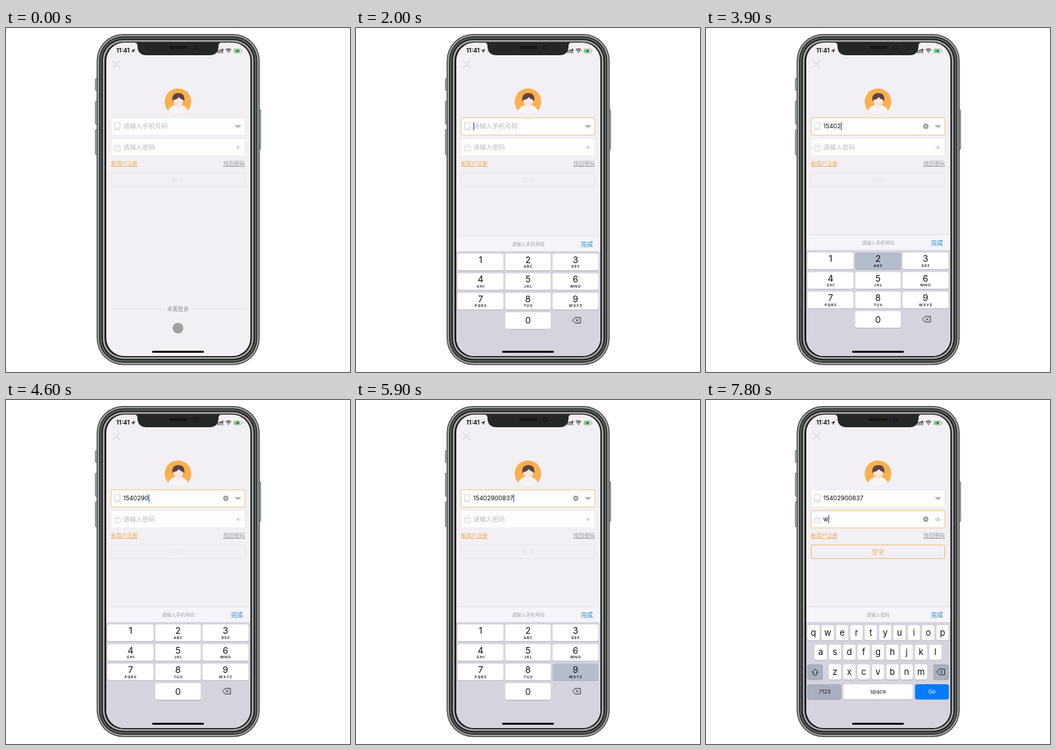
An HTML page for the animation above (8000 ms loop, 518x518 px).

```html
<!DOCTYPE html>
<html lang="zh-CN">
<head>
<meta charset="utf-8">
<title>Login</title>
<style>
  html, body { margin: 0; width: 100%; height: 100%; overflow: hidden; background: #fff; }
  svg { display: block; width: 100vw; height: 100vh; font-family: Inter, "Noto Sans CJK SC", "Noto Sans CJK", sans-serif; }
</style>
</head>
<body>
<svg id="stage" viewBox="0 0 518 518">
  <defs>
    <clipPath id="screen"><rect x="151" y="22" width="217" height="472" rx="27"/></clipPath>
    <clipPath id="portrait"><circle cx="259" cy="111" r="20"/></clipPath>
  </defs>

  <g fill="#b5b8b8" stroke="#555958" stroke-width=".8">
    <rect x="134.500" y="76" width="3" height="18" rx="1"/>
    <rect x="134.500" y="110" width="3" height="35" rx="1"/>
    <rect x="134.500" y="153" width="3" height="38" rx="1"/>
    <rect x="381" y="123" width="2.500" height="60" rx="1"/>
  </g>
  <g id="frame"></g>

  <g clip-path="url(#screen)">
    <rect x="151" y="22" width="217" height="472" fill="#f2f0f5"/>
    <path d="M161 49l11 11m0-11l-11 11" stroke="#c8c7cb" fill="none"/>
    <circle cx="259" cy="111" r="20" fill="#fbb04f"/>
    <g clip-path="url(#portrait)">
      <path d="M243 133c0-11 5-16 12-17h8c7 1 12 6 12 17z" fill="#f7f4f6"/>
      <path d="M252 106q7-6 15 0 0 8-4 11.500-3.500 3-7 0-4-3.500-4-11.500z" fill="#fde5df"/>
      <path d="M250.500 110q-1.500-12 9-12t9 12q-1.500 0-2-2-4-.5-6-4-3 4-8 4-.5 2-2 2z" fill="#5e4443"/>
    </g>
    <g id="form"></g>
    <g id="keyboard"></g>
    <rect x="220" y="486" width="78" height="3" rx="1.500" fill="#000"/>
    <text x="166" y="37.300" font-size="9.100" font-weight="600">11:41</text>
    <path d="M188 34.500l6.500-3.300-3 6.600-.4-3z" fill="#222"/>
    <g fill="#222">
      <path d="M318 34h1.500v1.500h-1.500zM320.500 33h1.500v2.500h-1.500zM323 32h1.500v3.500h-1.500zM325.500 31h1.500v4.500h-1.500zM318 36.500h1.500v1.300h-1.500zM320.500 36.500h1.500v1.300h-1.500zM323 36.500h1.500v1.300h-1.500zM325.500 36.500h1.500v1.300h-1.500z"/>
      <path d="M333.700 36.200h2.600l-1.300 1.600z"/>
    </g>
    <path d="M331 32.800q4-3 8 0M332.500 34.800q2.500-2 5 0" stroke="#222" stroke-width="1.300" fill="none"/>
    <rect x="343" y="31.300" width="11.500" height="6.400" rx="1.800" fill="none" stroke="#aaa" stroke-width=".8"/>
    <rect x="344" y="32.300" width="8" height="4.400" rx="1" fill="#4cd05f"/>
    <path d="M349.500 31.500l-2.200 3.400h1.500l-.6 2.800 2.300-3.500h-1.500z" fill="#174d20"/>
    <rect x="355.200" y="33.300" width="1" height="2.400" fill="#aaa"/>
  </g>

  <path d="M193 21v1q5 0 5 5 0 14 14 14h94q14 0 14-14 0-5 5-5v-1z" fill="#252627"/>
  <rect x="246" y="27.500" width="27" height="4" rx="2" fill="#141515"/>
  <circle cx="285" cy="29.500" r="3.500" fill="#14161a"/><circle cx="285" cy="29.500" r="1.500" fill="#30384a"/>
</svg>

<script>
const LOOP = 8000;
const FOCUS_PHONE = 1700, FOCUS_PASSWORD = 7100, PASSWORD_DOWN = 7500, PASSWORD_TYPED = 7600;
const PHONE = '15402900837';
// key, time pressed, time entered
const TAPS = [
  ['1', 2200, 2300], ['5', 2900, 3000], ['4', 3100, 3100], ['0', 3600, 3600], ['2', 3900, 3900],
  ['9', 4200, 4200], ['0', 4500, 4500], ['0', 4800, 4800], ['8', 5000, 5000], ['3', 5200, 5200],
  ['7', 5500, 5500], ['9', 5900, 5900], ['9', 6200, 6200]
];
// inset and colour of the nested metal rings
const RINGS = [
  [0, '#474a4a'], [1.5, '#a6a9a9'], [3.6, '#242626'], [5.2, '#646767'],
  [7.2, '#1d1e1e'], [9.3, '#acadaf'], [11.8, '#1d1e1e']
];
const form = document.getElementById('form');
const keyboard = document.getElementById('keyboard');

const rect = (x, y, w, h, fill, more = '') =>
  `<rect x="${x}" y="${y}" width="${w}" height="${h}" fill="${fill}" ${more}/>`;
const text = (x, y, size, fill, label, more = '') =>
  `<text x="${x}" y="${y}" font-size="${size}" fill="${fill}" ${more}>${label}</text>`;
const centred = (x, y, size, fill, label, more = '') =>
  text(x, y, size, fill, label, `text-anchor="middle" ${more}`);
const line = (d, color, width = 1) =>
  `<path d="${d}" fill="none" stroke="${color}" stroke-width="${width}"/>`;
const keyCap = (x, y, w, h, fill = '#fff') =>
  rect(x, y + .8, w, h, '#a3a5ae', 'rx="3"') + rect(x, y, w, h, fill, 'rx="3"');
const deleteIcon = (x, y) =>
  line(`M${x - 6} ${y}l4-4.300h8v8.600h-8zM${x - 1} ${y - 2}l4 4m0-4l-4 4`, '#222', .9);

document.getElementById('frame').innerHTML = RINGS.map(([inset, color]) =>
  rect(136.5 + inset, 9 + inset, 245.5 - 2 * inset, 498.5 - 2 * inset, color, `rx="${40 - inset}"`)).join('');

function field(y, value, hint, focused) {
  const mid = y + 13;
  let out = rect(158.2, y + .2, 201.6, 26, '#fdfdfe', `rx="1" stroke="${focused ? '#f3c47d' : '#eeecf1'}"`);
  out += value
    ? text(176.5, mid + 3.3, 9.2, '#111', value, focused ? 'class="typed"' : '')
    : text(176.6, mid + 3.3, 9.55, '#bbbabf', hint);
  if (focused && value) {
    out += `<circle cx="331" cy="${mid}" r="3.900" fill="#98989d"/>` +
      line(`M329.500 ${mid - 1.5}l3 3m0-3l-3 3`, '#fff', .9);
  }
  if (focused) out += rect(176.5, mid - 6, 1.3, 12, '#3f63c9', 'class="caret"');
  return out;
}

function drawForm({ phone, password, focus }) {
  const ready = password !== '';
  const button = ready ? '#f4b661' : '#e8e6eb';
  form.innerHTML =
    field(135, phone, '请输入手机号码', focus === 'phone') +
    line('M163.500 142.500h8v11h-8zM163.500 151h8M166.500 152.300h2', '#d3d2d6', .9) +
    '<path d="M344 146.200h10.500l-5.200 4.600z" fill="#b0afb3"/>' +
    field(166.5, password, '请输入密码', focus === 'password') +
    line('M163.500 178.500h8.500v6.500h-8.500zM165.200 178.500v-2q2.500-4 5 0v2M167.700 181v2', '#d3d2d6', .9) +
    line('M345 179.800q4.200-5.500 8.400 0q-4.200 5.500-8.400 0z', ready ? '#b9b8bd' : '#e4e3e7', .9) +
    `<circle cx="349.200" cy="179.800" r="1.600" fill="#c3c2c6"/>` +
    text(158, 207.1, 8, '#efaa46', '新用户注册') + line('M158 208.500h40', '#efaa46', .8) +
    text(327.2, 207.1, 8.1, '#96959a', '找回密码') + line('M327 208.500h33', '#96959a', .8) +
    rect(158.5, 218.2, 201, 20.5, 'none', `rx="2" stroke="${button}"`) +
    centred(259, 231.9, 9.5, button, '登录') +
    line('M160 423h78M280 423h80', '#dedde1', .9) +
    centred(258.7, 426, 8, '#8e8d92', '禾笺登录') +
    '<circle cx="259" cy="452" r="8" fill="#a0a0a0"/>';

  const caret = form.querySelector('.caret');
  const typed = form.querySelector('.typed');
  if (caret && typed) caret.setAttribute('x', 176.5 + typed.getComputedTextLength());
}

function numberPad(pressed) {
  const letters = ['', 'ABC', 'DEF', 'GHI', 'JKL', 'MNO', 'PQRS', 'TUV', 'WXYZ'];
  let out = '';
  for (let i = 0; i < 9; i++) {
    const label = String(i + 1), x = 153 + i % 3 * 71.5, y = 338 + Math.floor(i / 3) * 29.5;
    out += keyCap(x, y, 69, 25.3, pressed === label ? '#b4bdcc' : '#fff') +
      centred(x + 34.5, y + 14.2, 13.5, '#111', label) +
      centred(x + 35, y + 21.7, 5.3, '#111', letters[i], 'font-weight="600" letter-spacing="1"');
  }
  return out + keyCap(224.5, 426.3, 69, 25.3, pressed === '0' ? '#b4bdcc' : '#fff') +
    centred(259, 443.5, 13.5, '#111', '0') + deleteIcon(332, 438.5);
}

function letterPad(pressed) {
  let out = '', popup = '';
  ['qwertyuiop', 'asdfghjkl', 'zxcvbnm'].forEach((row, r) => [...row].forEach((letter, i) => {
    const x = 259 + (i - (row.length - 1) / 2) * 21.6, y = 339 + r * 29.5;
    out += keyCap(x - 9.3, y, 18.6, 23, '#fff') + centred(x, y + 15.6, 13, '#111', letter);
    if (letter === pressed) {
      popup = `<path d="M${x - 12} ${y - 29}h24q4 0 4 4v14q0 4-4 7-2.700 2-2.700 5v19q0 3-3 3h-12.600q-3 0-3-3v-19q0-3-2.700-5-4-3-4-7v-14q0-4 4-4z" fill="#fff" stroke="#c4c4cc" stroke-width=".6"/>` +
        centred(x, y - 9, 20, '#111', letter);
    }
  }));
  return out +
    keyCap(152.5, 398, 23.5, 23, '#a9afbe') + keyCap(342, 398, 23.5, 23, '#a9afbe') +
    line('M164.200 405l4.800 5h-2.500v4h-4.600v-4h-2.500z', '#222', .9) + deleteIcon(353.5, 409.5) +
    keyCap(152.5, 428, 51.5, 22.7, '#a9afbe') + centred(178, 442.2, 8, '#111', '.?123') +
    keyCap(207, 428, 104.5, 22.7) + centred(259.2, 442, 8.2, '#111', 'space') +
    keyCap(314.8, 428, 50.8, 22.7, '#087aff') + centred(340.2, 442.2, 8.2, '#fff', 'Go') + popup;
}

function drawKeyboard({ focus, pressed }) {
  const phone = focus === 'phone';
  keyboard.innerHTML = rect(151, 311, 217, 24, '#f5f4f8') + line('M151 311.400h217', '#dddce2', .8) +
    centred(259.3, 326.4, 7, '#a3a2a7', phone ? '请输入手机号码' : '请输入密码') +
    text(338.7, 327, 9.1, '#1985d8', '完成', 'font-weight="500"') +
    rect(151, 334.5, 217, 160, '#d4d4df') +
    (phone ? numberPad(pressed) : letterPad(pressed));
}

function stateAt(t) {
  if (t >= FOCUS_PASSWORD) {
    return {
      focus: 'password', phone: PHONE,
      password: t >= PASSWORD_TYPED ? 'w' : '',
      pressed: t >= PASSWORD_DOWN && t < PASSWORD_TYPED + 100 ? 'w' : ''
    };
  }
  const tap = TAPS.find(([, down, entered]) => t >= down && t < entered + 100);
  return {
    focus: t >= FOCUS_PHONE ? 'phone' : '',
    phone: PHONE.slice(0, TAPS.filter(([, , entered]) => t >= entered).length),
    password: '', pressed: tap ? tap[0] : ''
  };
}

let shown = '';
function update() {
  const t = performance.now() % LOOP;
  const state = stateAt(t), key = JSON.stringify(state);
  if (key !== shown) {
    drawForm(state);
    drawKeyboard(state);
    shown = key;
  }
  const slide = t < FOCUS_PHONE ? 200 : t < 2100 ? 71.3 * Math.exp((FOCUS_PHONE - t) / 80) : 0;
  keyboard.setAttribute('transform', `translate(0 ${slide.toFixed(2)})`);
  requestAnimationFrame(update);
}
update();
</script>
</body>
</html>
```
